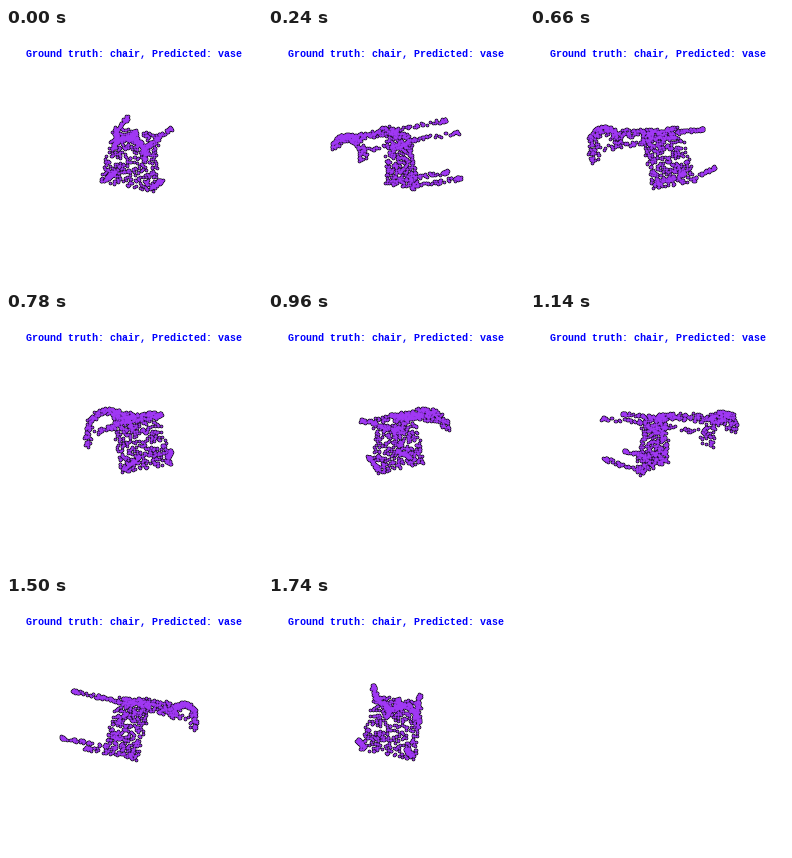
Write a matplotlib script that moves like this. It is 256x256 px and loops after 1800 ms.

```python
import numpy as np
import matplotlib.pyplot as plt
from matplotlib.animation import FuncAnimation

SIZE, FRAMES, INTERVAL = 256, 30, 60
CENTER, DEPTH = 128, 300
PURPLE = "#a038f4"

rng = np.random.default_rng(7)

# Chair axes: w across the seat, v towards its front edge, l along the legs.
W = np.array([0.95, 0.20, -0.24])
V = np.array([-0.20, 0.95, 0.20])
L = np.array([0.20, -0.13, 0.97])

# Seat corners: back left, back right, front left, front right.
BACK_L, BACK_R, FRONT_L, FRONT_R = np.array(
    [[-22, -30, 6.5], [25, -22, -3], [-33, 24, 17], [21, 34, 10]])
TIPS = [(-6, -31, 62), (30, -23.5, 53), (-16, 12, 70), (21, 19.5, 61)]


def seat_at(a, b):
    a, b = np.reshape(a, (-1, 1)), np.reshape(b, (-1, 1))
    back = BACK_L + a * (BACK_R - BACK_L)
    front = FRONT_L + a * (FRONT_R - FRONT_L)
    return back + b * (front - back)


def jitter(n, w=0.0, v=0.0, l=0.0):
    r = rng.uniform(-1, 1, (n, 3))
    return r[:, :1] * w * W + r[:, 1:2] * v * V + r[:, 2:] * l * L


def bar(start, end, n, w=1.6, v=1.6, tip=0.0):
    start, end = np.array(start, float), np.array(end, float)
    t = rng.random((n, 1))
    k = int(n * tip)
    t[:k] = 0.9 + 0.1 * t[:k]
    return start + t * (end - start) + jitter(n, w, v)


def seat(n):
    return seat_at(rng.random(n), rng.random(n)) + jitter(n, l=2)


def rail(n):
    a = rng.uniform(-1, 1, (n, 1)) * np.pi / 2
    arc = (np.array([-7, -2.5, -65]) + np.sin(a) * np.array([20, 5.5, 0.5])
           - np.cos(a) * 21 * V)
    return arc + jitter(n, 1.5, 2.5, 6)


def chair():
    joints = seat_at([0.08, 0.92, 0.08, 0.92], [0.1, 0.1, 0.96, 0.94])
    legs = [bar(j, t, n, tip=0.3)
            for j, t, n in zip(joints, TIPS, (58, 42, 62, 58))]
    posts = [bar((-18, -26, 4), (-22, -17, -62), 75, 2, 3),
             bar((1, -25, 1), (-7, -21, -62), 75, 2, 3),
             bar((20, -15, -2), (8, -7, -62), 36, 2, 2)]
    return np.vstack([seat(400), rail(190)] + legs + posts)


POINTS = chair()


def project(angle):
    x, y, z = POINTS.T
    c, s = np.cos(angle), np.sin(angle)
    scale = DEPTH / (DEPTH - (z * c - x * s))
    px = CENTER + scale * (x * c + z * s)
    py = CENTER + scale * y
    return np.floor(px) + 0.5, np.floor(py) + 0.5


fig = plt.figure(figsize=(SIZE / 72, SIZE / 72), dpi=72, facecolor="white")
ax = fig.add_axes([0, 0, 1, 1])
ax.set(xlim=(0, SIZE), ylim=(SIZE, 0))
ax.axis("off")
ax.text(20, 29, "Ground truth: chair, Predicted: vase", color="#0000ff",
        family="Liberation Mono", weight="bold", size=10, va="baseline")

dots = dict(ls="", marker="o", mew=0, antialiased=False)
rims, = ax.plot([], [], color="black", ms=3.6, **dots)
cores, = ax.plot([], [], color=PURPLE, ms=2.3, **dots)


def update(i):
    xy = project(2 * np.pi * i / FRAMES)
    rims.set_data(*xy)
    cores.set_data(*xy)
    return rims, cores


anim = FuncAnimation(fig, update, frames=FRAMES, interval=INTERVAL,
                     repeat=True, repeat_delay=0, blit=False)
plt.show()
```
